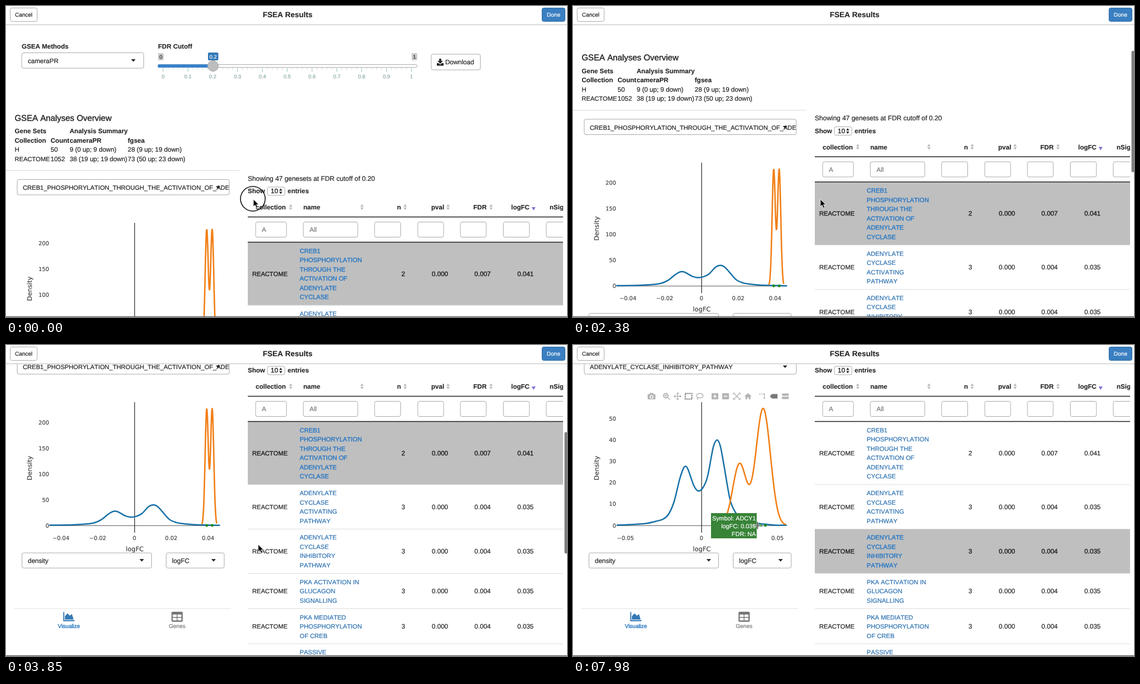
Write an HTML page that moves like this. It is 1000x555 px and loops after 8 s.

```html
<!DOCTYPE html>
<html lang="en">
<head>
<meta charset="utf-8">
<title>FSEA Results</title>
<style>
html, body { margin: 0; width: 100%; height: 100%; overflow: hidden; background: #fff; }
svg { display: block; width: 1000px; height: 555px; text-rendering: geometricPrecision; }
text {
  font: 11.55px "Liberation Sans", Arial, sans-serif; font-kerning: none; white-space: pre;
  color: #222; fill: currentColor; stroke: currentColor; stroke-width: .2px;
}
.b { font-weight: bold; stroke-width: .1px; }
.mid { text-anchor: middle; }
.end { text-anchor: end; }
.caps { font-size: 11.1px; }
.link { color: #2a70b0; }
.on { stroke-width: .4px; }
.link.on { color: #2677c4; }
.small { font-size: 10px; }
.tiny { font-size: 9.3px; }
.tick { font: 9.9px "DejaVu Sans", Verdana, sans-serif; color: #333; stroke-width: .1px; }
.axis { font: 11.4px "DejaVu Sans", Verdana, sans-serif; color: #333; stroke-width: .1px; }
.white { color: #fff; }
.hint { color: #777; }
.pale { color: #8aa6a6; }
.box { fill: #fff; stroke: #aaa; }
</style>
</head>
<body>
<svg id="stage" viewBox="0 0 1000 555"></svg>
<script>
const LOOP = 8000, STEP = 70;
const PICKED = 4760, REDRAWN = 4830;   // row selected, chart refreshed
const BASE = 607;                      // chart baseline on the page

const text = (x, y, s, cls = '', more = '') => `<text x="${x}" y="${y}" class="${cls}" ${more}>${s}</text>`;
const rect = (x, y, w, h, more) => `<rect x="${x}" y="${y}" width="${w}" height="${h}" ${more}/>`;
const path = (d, more = '') => `<path d="${d}" ${more}/>`;
const stroke = (d, color, width = 1, more = '') => path(d, `fill="none" stroke="${color}" stroke-width="${width}" ${more}`);
const box = (x1, y1, x2, y2) => rect(x1, y1, x2 - x1, y2 - y1, 'rx="3" class="box"');
const caret = (x, y) => path(`M${x - 4} ${y - 2}h8l-4 4.5z`, 'fill="#222"');
const group = (s, more = '') => `<g ${more}>${s}</g>`;
const range = (n, f) => Array.from({ length: n }, (_, i) => f(i)).join('');

function controls() {
  const ticks = range(51, i => {
    const x = 280 + i * 8.85, major = i % 5 === 0;
    return stroke(`M${x} 110.5v${major ? 7 : 3}`, major ? '#9bc0c0' : '#ccc')
      + (major ? text(x, 129, i / 50, 'mid tiny pale') : '');
  });
  return text(28, 75.5, 'GSEA Methods', 'b') + box(28, 83.5, 245.5, 111) + text(39, 102, 'cameraPR') + caret(227, 97)
    + text(271, 75.5, 'FDR Cutoff', 'b')
    + rect(271, 84, 10, 13, 'rx="2" fill="#ccc"') + text(276, 94, 0, 'mid tiny')
    + rect(723, 84, 10, 13, 'rx="2" fill="#ccc"') + text(728, 94, 1, 'mid tiny')
    + rect(360, 83, 18.5, 14, 'rx="2" fill="#337ab7"') + text(369.2, 94, 0.2, 'mid tiny white')
    + ticks
    + rect(271, 104.5, 462, 5, 'rx="2.5" fill="#fff" stroke="#aaa"')
    + rect(270.5, 104, 98, 6, 'rx="2.5" fill="#3b82c8"')
    + '<circle cx="369" cy="107" r="9.5" fill="#bdbdbd" stroke="#aaa"/>'
    + box(758, 86, 845.5, 114) + text(783, 104, 'Download')
    + path('M772.2 94h3.6v4h3l-4.8 5-4.8-5h3z', 'fill="#222"')
    + path('M768 102h3l3 2.5 3-2.5h3v4.5h-12z', 'fill="#222"');
}

function overview() {
  const cols = [15.5, 79.5, 113.5, 217];
  const rows = [
    ['Gene Sets', '', 'Analysis Summary', ''],
    ['Collection', 'Count', 'cameraPR', 'fgsea'],
    ['H', '50', '9 (0 up; 9 down)', '28 (9 up; 19 down)'],
    ['REACTOME', '1052', '38 (19 up; 19 down)', '73 (50 up; 23 down)']];
  return text(15.5, 204.5, 'GSEA Analyses Overview', 'on', 'style="font-size:14.95px"')
    + rows.map((row, r) => row.map((s, c) =>
      text(cols[c], 227 + r * 16.5, s, (r < 2 ? 'b' : '') + (s === 'REACTOME' ? ' caps' : ''))).join('')).join('')
    + stroke('M0 293.5H416', '#d8d8d8');
}

const geneSets = [
  ['CREB1|PHOSPHORYLATION|THROUGH THE|ACTIVATION OF|ADENYLATE|CYCLASE', 2, '0.007', '0.041'],
  ['ADENYLATE|CYCLASE|ACTIVATING|PATHWAY', 3, '0.004', '0.035'],
  ['ADENYLATE|CYCLASE|INHIBITORY|PATHWAY', 3, '0.004', '0.035'],
  ['PKA ACTIVATION IN|GLUCAGON|SIGNALLING', 3, '0.004', '0.035'],
  ['PKA MEDIATED|PHOSPHORYLATION|OF CREB', 3, '0.004', '0.035'],
  ['PASSIVE|TRANSPORT|BY|AQUAPORINS', 3, '0.004', '0.035']];

function table(selected) {
  const heads = [[445, 'collection', 507.5], [530, 'name', 634.5], [697, 'n', 711.5], [758, 'pval', 788],
    [833, 'FDR', 864.5], [900.5, 'logFC', 940.5], [969, 'nSig']];
  const filters = [[445, 500], [530, 627], [657, 703.5], [734, 780], [810, 856], [886.5, 933], [963, 1010]];
  let s = text(431, 311.5, 'Showing 47 genesets at FDR cutoff of 0.20', '', 'style="font-size:11.9px"')
    + text(431, 334, 'Show', 'b') + box(466, 323, 497, 338) + text(472, 334.3, 10, 'on')
    + path('M487 329.5l2.7-4 2.7 4zM487 331.5l2.7 4 2.7-4z', 'fill="#222"') + text(502, 334, 'entries', 'b');
  for (const [x, name, icon] of heads) {
    s += text(x, 363, name, 'b');
    if (name === 'logFC') s += path(`M${icon - 3.5} 359h7l-3.5 6z`, 'fill="#7b74d4"');
    else if (icon) s += path(`M${icon - 3} 358l3-4.5 3 4.5zM${icon - 3} 359.5l3 4.5 3-4.5z`, 'fill="#bbb"');
  }
  s += stroke('M431 376.5H993', '#222', 1.3);
  for (const [a, b] of filters) s += box(a, 385.5, b, 412.5);
  s += text(456, 403, 'A', 'hint') + text(541, 403, 'All', 'hint');

  let top = 421.8;
  geneSets.forEach(([name, n, fdr, fc], i) => {
    const lines = name.split('|'), height = lines.length * 16.5 + 13.3, on = i === selected ? ' on' : '';
    const mid = top + height / 2 + 4;
    s += on ? rect(431, top, 562, height, 'fill="#bfbfbf"') : i ? stroke(`M431 ${top}H993`, '#ddd') : '';
    s += text(439, mid, 'REACTOME', 'caps' + on)
      + lines.map((l, k) => text(523.5, top + 19 + k * 16.5, l, 'caps link' + on)).join('')
      + [[711.5, n], [788, '0.000'], [864, fdr], [940.5, fc]].map(([x, v]) => text(x, mid, v, 'end' + on)).join('');
    top += height;
  });
  return group(s + stroke('M431 421.5H993', '#222', 1.4), 'clip-path="url(#tableClip)"');
}

// Background density in wide-chart pixels: offset from zero, height
const density = [[-151, .5], [-129, 1.5], [-99, 3.5], [-81, 7.5], [-69, 11], [-59, 19.5], [-49, 42], [-39, 82],
  [-33, 100], [-29, 105.5], [-24, 100], [-14, 72], [-6, 61.5], [3, 68], [11, 88], [21, 139.5], [28, 152.5],
  [34, 140], [41, 102], [51, 46], [61, 22.5], [71, 13.5], [86, 6.5], [101, 3.5], [111, 2.5], [131, .5], [152, .5]];

function smooth(p) {
  let d = `M${p[0]}`;
  for (let i = 0; i < p.length - 1; i++) {
    const a = p[i - 1] || p[i], b = p[i], c = p[i + 1], e = p[i + 2] || c;
    d += `C${b.map((v, k) => v + (c[k] - a[k]) / 6)} ${c.map((v, k) => v - (e[k] - b[k]) / 6)} ${c}`;
  }
  return d;
}

function chart({ kx, ky, points, sigma, peak, xs, xStep, ys, yStep }) {
  const blue = density.map(([x, h]) => [229 + x * kx, BASE - h * ky]);
  const start = points[0] - 3 * sigma, count = Math.ceil((points.at(-1) - points[0] + 6 * sigma) * 2);
  const orange = Array.from({ length: count }, (_, i) => {
    const x = start + i / 2;
    return [x, BASE - peak * points.reduce((sum, p) => sum + Math.exp(-((x - p) ** 2) / (2 * sigma ** 2)), 0)];
  });
  return stroke(`M77 ${BASE}.3H381`, '#555') + stroke(`M229.3 387V620`, '#333', 1.3)
    + group(stroke(smooth(blue), '#1670a6', 2.5) + stroke('M' + orange.join('L'), '#f27f16', 2.6), 'clip-path="url(#chartClip)"')
    + points.map(x => `<circle cx="${x}" cy="${BASE}" r="2.4" fill="#128a12"/>`).join('')
    + xs.map((s, i) => text(229 + (i - (xs.length - 1) / 2) * xStep, 632.7, s, 'tick mid')).join('')
    + ys.map((s, i) => text(76.8, BASE + 3.5 - i * yStep, s, 'tick end')).join('');
}

const narrowChart = chart({ kx: 1.212, ky: .2415, points: [357.8, 367.5], sigma: 2.87, peak: 208,
  xs: ['−0.04', '−0.02', '0', '0.02', '0.04'], xStep: 65.6, ys: [0, 50, 100, 150, 200], yStep: 46 });
const wideChart = chart({ kx: 1, ky: 1, points: [297, 335, 343], sigma: 12.2, peak: 110,
  xs: ['−0.05', '0', '0.05'], xStep: 135.5, ys: [0, 10, 20, 30, 40, 50], yStep: 38.1 });

function modebar() {
  const y = 376.5, light = '#b4b4b4', dark = '#777';
  const at = (x, s) => group(s, `transform="translate(${x} ${y})"`);
  const square = rect(-6, -5.5, 12, 11, `rx="1" fill="${light}"`);
  return at(140, rect(-7, -4, 14, 9.5, `rx="1.5" fill="${light}"`) + rect(-3, -6, 6, 3, `fill="${light}"`)
      + `<circle cy="1" r="2.6" fill="${light}" stroke="#fff" stroke-width="1.4"/>`)
    + at(166.5, `<circle cx="-1" cy="-1" r="4" fill="none" stroke="${light}" stroke-width="2"/>`
      + stroke('M2 2l4 4M-3 -1h4M-1 -3v4', light, 1.5))
    + at(186.5, stroke('M-6 0H6M0 -6V6M-4 -2l-2 2 2 2M4 -2l2 2-2 2M-2 -4l2-2 2 2M-2 4l2 2 2-2', light, 1.3))
    + at(206, rect(-6, -5, 12, 10, `fill="none" stroke="${dark}" stroke-width="1.8" stroke-dasharray="2.4 1.3"`))
    + at(226, `<ellipse cy="-1" rx="6" ry="4" fill="none" stroke="${light}" stroke-width="1.4"/>` + stroke('M-4 2q-1 3 1 4', light, 1.4))
    + at(253, square + stroke('M-3 0H3M0 -3V3', '#fff', 1.6))
    + at(272, square + stroke('M-3 0H3', '#fff', 1.6))
    + at(292, stroke('M-6 -3v-2.5h3M6 -3v-2.5h-3M-6 3v2.5h3M6 3v2.5h-3M-4 -4l8 8M4 -4l-8 8', light, 1.4))
    + at(312, path('M-6.5 0L0 -5.5 6.5 0H4.5V5.5H1.5V2H-1.5V5.5H-4.5V0z', `fill="${light}"`))
    + at(338, stroke('M-6 -4H3', light, 1.5, 'stroke-dasharray="2 1.5"') + stroke('M3 -5V5', light, 2, 'stroke-dasharray="4 1.5"'))
    + at(358, path('M-7 0l3.5-4H6.5V4H-3.5z', `fill="${dark}"`))
    + at(378, path('M-6.5 -2.8l2-2.2H6.5V-.7H-4.5zM-6.5 2.8l2-2.1H6.5V5H-4.5z', `fill="${light}"`));
}

function leftPanel() {
  return text(0, 0, 'Density', 'axis mid', 'transform="translate(46 504.5) rotate(-90)"')
    + text(229.5, 652.5, 'logFC', 'axis mid')
    + box(28.5, 656, 259.5, 683) + text(39, 673.8, 'density') + caret(242, 669)
    + box(285.5, 656, 389, 683) + text(296, 673.8, 'logFC') + caret(370, 669)
    + stroke('M15 755.5H401', '#e4e4e4')
    + stroke('M103 761.5V777H122', '#337ab7', 1.8) + path('M105 775V769l4.5-5 4.5 4 3.5-3 3 10z', 'fill="#337ab7"')
    + text(112, 789.5, 'Visualize', 'mid small link on', 'style="font-size:9.8px"')
    + rect(295, 761, 20, 18, 'rx="2" fill="#777"')
    + range(4, i => rect(297.2 + i % 2 * 8.4, 766 + (i >> 1) * 6, 7, 4.5, 'fill="#fff"'))
    + text(305, 789.5, 'Genes', 'mid small hint');
}

const setPicker = name => box(20, 309.5, 398, 337)
  + group(text(30, 328, name, '', 'style="font-size:11.1px"'), 'clip-path="url(#pickerClip)"') + caret(378, 323.5);

const tooltip = path('M246 585H327.500V601.500L334 607 327.500 612.500V630H246z', 'fill="#378337"')
  + ['Symbol: ADCY1', 'logFC: 0.039', 'FDR: NA'].map((s, i) => text(326, 597.7 + i * 14, s, 'end white', 'style="font-size:10.8px"')).join('');

const clip = (id, x, y, w, h) => `<clipPath id="${id}">${rect(x, y, w, h, '')}</clipPath>`;

stage.innerHTML = `<defs>${clip('tableClip', 430, 290, 563, 700)}${clip('chartClip', 77, 380, 304.5, 230)}${clip('pickerClip', 20, 309, 377.5, 28)}</defs>`
  + group(controls() + overview() + leftPanel()
    + group(setPicker('CREB1_PHOSPHORYLATION_THROUGH_THE_ACTIVATION_OF_ADENYLATE_CYCLASE') + table(0), 'id="before"')
    + group(setPicker('ADENYLATE_CYCLASE_INHIBITORY_PATHWAY') + table(2), 'id="after"')
    + group(narrowChart, 'id="narrow"') + group(wideChart, 'id="wide"')
    + group(modebar(), 'id="tools"') + group(tooltip, 'id="tip"'), 'id="page"')
  + rect(0, 0, 1000, 33, 'fill="#fff"') + stroke('M0 33.5H1000', '#bbb')
  + box(7.5, 3.5, 55.5, 27.5) + text(31.5, 18.7, 'Cancel', 'mid small')
  + text(502, 19.7, 'FSEA Results', 'b mid', 'style="font-size:13.5px"')
  + rect(955.5, 3.5, 41, 24, 'rx="3" fill="#3a7fc1" stroke="#2e6da4"') + text(976, 18.7, 'Done', 'mid small white')
  + rect(0, 553.7, 1000, 1.3, 'fill="#666"')
  + rect(995.5, 0, 6, 216.5, 'rx="2.5" fill="#7d7d7d" id="thumb"')
  + '<circle r="22" fill="none" stroke="#111" stroke-width="1.6" id="ring"/>'
  + path('M0 0V13l3-2.800 2.300 5.200 2.400-1-2.300-5H9.500z', 'id="arrow" stroke="#fff" stroke-width=".8"')
  + group(stroke('M-7 0H7M0 -7V7', '#fff', 2.6) + stroke('M-6.500 0H6.500M0 -6.500V6.500', '#222', 1.2), 'id="cross"');

const scrollKeys = [[1190, 0], [1540, 32], [2380, 107.5], [3010, 212.5], [3290, 258], [3570, 285]];
const pointerKeys = [[3500, 441, 345], [3780, 449.5, 356], [5180, 449.5, 356], [5950, 396, 354],
  [6580, 385, 356], [7000, 350, 305], [7560, 320, 268], [7700, 320, 268], [7910, 329, 322]];

function track(keys, t) {
  const next = keys.findIndex(k => k[0] > t);
  if (next === 0) return keys[0].slice(1);
  if (next < 0) return keys.at(-1).slice(1);
  const a = keys[next - 1], b = keys[next], u = (t - a[0]) / (b[0] - a[0]);
  return a.slice(1).map((v, i) => v + (b[i + 1] - v) * u);
}
const fade = (t, from, to) => Math.min(1, Math.max(0, (t - from) / (to - from)));

const $ = id => document.getElementById(id);
const show = (id, on) => $(id).setAttribute('opacity', Number(on));
const move = (id, x, y) => $(id).setAttribute('transform', `translate(${x} ${y})`);

function draw(now) {
  const t = Math.floor(now % LOOP / STEP) * STEP;
  const [scroll] = track(scrollKeys, t), [x, y] = track(pointerKeys, t);
  const crossed = t > 6580 && x < 381 && y <= 322;
  move('page', 0, -scroll);
  move('thumb', 0, 34.4 + .425 * scroll);
  show('thumb', t < 1190 ? 0 : 1 - fade(t, 3990, 4200));
  show('before', t < PICKED);
  show('after', t >= PICKED);
  show('narrow', t < REDRAWN);
  show('wide', t >= REDRAWN);
  show('tools', fade(t, 6020, 6300));
  show('tip', t >= 7910);
  move('ring', x - 1, y - 1);
  show('ring', t < 350 || (t >= 4270 && t < 4480));
  move('arrow', x, y);
  show('arrow', !crossed);
  move('cross', x, y);
  show('cross', crossed);
}

const begin = performance.now();
(function frame() {
  draw(performance.now() - begin);
  requestAnimationFrame(frame);
})();
</script>
</body>
</html>
```
